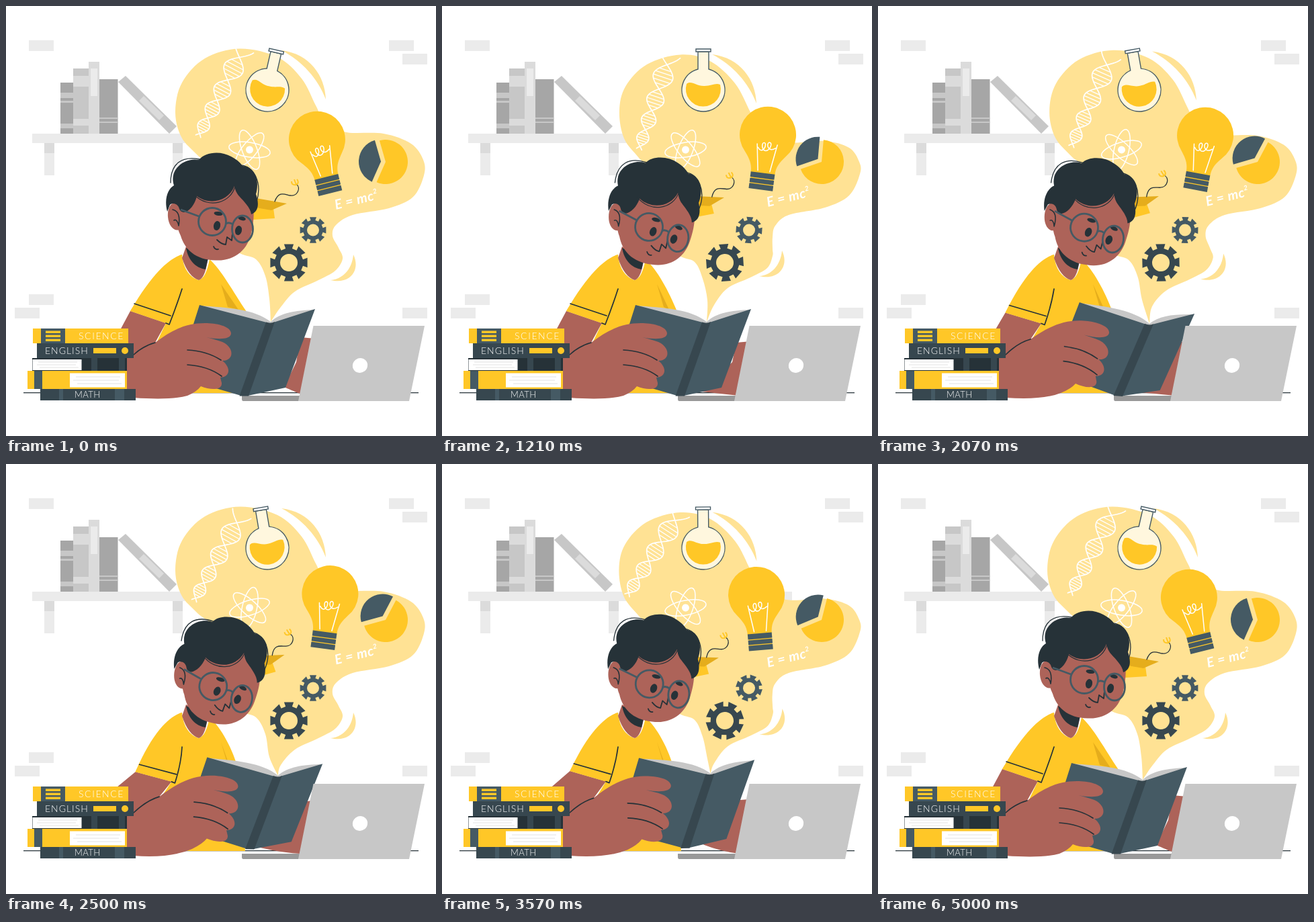
An HTML page that plays this animation: 640 by 640 pixels, repeating every 5.07 s.

```html
<!DOCTYPE html>
<html lang="en">
<head>
<meta charset="utf-8">
<title>Reading</title>
<style>
html,body{margin:0;width:100%;height:100%;overflow:hidden;background:#fff}
svg{display:block;width:100%;height:100%}
text{font-family:Lato,"Open Sans",sans-serif}
.spine{font-weight:300;font-size:14px;fill:#fff}
.line{fill:none;stroke:#263238;stroke-linecap:round;stroke-linejoin:round}
.white{fill:none;stroke:#fff;stroke-linecap:round}
</style>
</head>
<body>
<svg viewBox="0 0 640 640">
  <g id="bricks" fill="#ebebeb"></g>
  <path fill="#ebebeb" d="M39 190H521V204H39ZM57 204h15v48h-15zM248 204h15v48h-15z"/>
  <path fill="#dbdbdb" d="M57 204h15v15h-15zM248 204h15v15h-15z"/>
  <g id="shelf"></g>
  <path fill="#c7c7c7" d="M167 113L178 104L254 179L243 190Z"/>
  <path fill="#dbdbdb" d="M198 141L205 134L235 163L228 170Z"/>
  <path stroke="#263238" stroke-width="1.3" d="M26 575.7H614"/>

  <path id="blob" fill="#ffe294"/>
  <path id="arcTop" fill="#ffe294" d="M410 66C452 71 475 104 476 139C464 108 441 82 410 66Z"/>
  <path id="arcLow" fill="#ffe294" d="M517 370C528 392 513 415 483 408C501 407 515 392 517 370Z"/>
  <g id="dna" class="white" stroke-width="1.7"></g>
  <g id="atom" class="white" stroke-width="1.5"></g>

  <g id="flask">
    <path fill="#fff7de" stroke="#455a64" stroke-width="1.4" d="M-8 -57V-31A32 32 0 1 0 8 -31V-57Z"/>
    <path fill="#ffc727" d="M-25 -9C-18 -15 -10 -5 2 -6C12 -6 18 -11 25 -8A26 26 0 1 1 -25 -9Z"/>
    <path fill="#fff" stroke="#455a64" stroke-width="1.4" d="M-11 -61H11V-57H-11Z"/>
  </g>

  <g id="bulb">
    <path id="rays" class="line" stroke-width="1.4" style="stroke-linecap:butt"/>
    <path fill="#ffc727" d="M-18 58C-18 44 -24 37 -31 28A42 42 0 1 1 31 28C24 37 18 44 18 58Z"/>
    <path class="white" stroke-width="1.5" d="M-8 54L-14 15M10 54L16 13M-12 20C-4 32 2 12 -4 12C-9 13 -5 27 2 23C8 18 8 9 3 11C-1 14 4 26 14 18"/>
    <path fill="#ffc727" d="M-17 57H17V81H-17Z"/>
    <path fill="#455a64" d="M-18 57H18V65H-18ZM-18 66.3H18V73H-18ZM-18 74.3H18V82H-18Z"/>
  </g>

  <path id="pieBig" fill="#ffc727"/>
  <path id="pieCut" fill="#455a64"/>
  <text id="formula" fill="#fff" font-size="20" font-weight="700" font-style="italic" text-anchor="middle" letter-spacing=".6">E = mc<tspan font-size="10" dy="-9">2</tspan></text>
  <path id="gearBig" fill="#37474f" fill-rule="evenodd"/>
  <path id="gearSmall" fill="#455a64" fill-rule="evenodd"/>

  <g id="cap">
    <path fill="#ffc727" d="M-50 6L-20 7L-18 22L-50 24Z"/>
    <path fill="#e5ad1c" d="M0 0L-46 -8L-58 4L-23 10Z"/>
    <path class="line" stroke-width="1.3" d="M-18 -3C-12 -20 -2 -13 5 -12C15 -10 22 -23 14 -29"/>
    <path fill="none" stroke="#ffc727" stroke-width="2" d="M14 -28C8 -27 7 -30 7 -33M14 -28L11 -36M14 -28C18 -30 17 -34 15 -36"/>
  </g>

  <path id="shirt" fill="#ffc727"/>
  <path id="fold" fill="#e5ad1c"/>
  <path fill="#ad6359" d="M268 358L262 375C268 394 277 405 287 408C295 405 298 392 301 374Z"/>
  <path fill="#263238" d="M268 360L301 375L297 392C282 390 271 378 268 360Z"/>

  <g id="head">
    <path class="line" stroke-width="1.3" d="M245 263C245 234 262 223 288 228M342 237C368 233 382 262 373 291"/>
    <path fill="#ad6359" d="M262 278C254 300 250 322 260 342C266 362 282 378 312 378.500C341 380 360 362 365 338C371 312 371 288 355 264L300 255Z"/>
    <path fill="#ad6359" d="M254 294C245 290 240 302 241 314C242 327 250 336 258 333L264 310Z"/>
    <path class="line" stroke-width="1.6" d="M248 303C257 305 259 315 257 327M250 319C253 317 256 321 257 327"/>
    <path fill="#263238" d="M240 306C235 287 241 272 250 267C242 243 266 225 287 229C296 217 320 215 335 224C345 229 350 235 352 238C370 239 378 259 372 280C377 294 376 306 365 310C364 300 354 291 348 284C343 279 341 273 340 268C331 291 303 297 284 283C281 296 273 305 266 307C262 307 259 305 258 302C256 294 248 292 244 296Z"/>
    <path class="line" stroke-width="1.2" d="M280 281C302 303 335 293 341 268C343 280 350 286 356 289"/>
    <g id="face">
      <g fill="#263238">
        <ellipse cx="316" cy="309" rx="6.500" ry="3" transform="rotate(8 316 309)"/>
        <ellipse cx="351" cy="316" rx="6" ry="3" transform="rotate(18 351 316)"/>
      </g>
      <g id="eyes" fill="#263238"></g>
      <path class="line" stroke-width="1.8" d="M314 348C318 352 322 355 327 355L329 344L336 349L337 338M309 358C310 361 313 363 316 362"/>
      <g fill="none" stroke="#455a64" stroke-width="2.800">
        <ellipse cx="307" cy="321" rx="20.500" ry="20.500"/>
        <ellipse cx="352" cy="332" rx="15.500" ry="20"/>
        <path d="M327 324Q332 321 338 325M287 313L260 303"/>
      </g>
    </g>
  </g>

  <path fill="#999" d="M351 580H522V588H353Q351 588 351 585Z"/>
  <path id="armRight" fill="#ad6359"/>
  <g id="book">
    <path fill="#c7c7c7" d="M288 446C330 449 370 451 394 470C408 457 430 453 459 452L400 490Z"/>
    <path id="page" fill="#e0e0e0"/>
    <path fill="#455a64" d="M288 445L388 471L350 580L254 552ZM398 471L460 451L416 568L360 580Z"/>
    <path fill="#37474f" d="M387 470.500Q394 473 400 470L361 580.500H347.500Z"/>
  </g>
  <path id="armLeft" fill="#ad6359"/>
  <path id="sleeve" fill="#ffc727"/>
  <path id="armLines" class="line" stroke-width="1.7"/>

  <g id="stack"></g>
  <g class="spine">
    <text x="108" y="496" letter-spacing="1.600">SCIENCE</text>
    <text x="58" y="518" letter-spacing="1">ENGLISH</text>
    <text x="102" y="583" font-size="13" letter-spacing=".4">MATH</text>
  </g>
  <circle cx="177" cy="513" r="5" fill="#ffc727"/>
  <path stroke="#dbdbdb" stroke-width=".8" d="M48 530H106M46 534H104M50 538H108M104 552H170M100 557H168M106 562H172"/>
  <path fill="#c7c7c7" d="M457.500 476H623L600 588H435Z"/>
  <ellipse cx="527" cy="535" rx="11.300" ry="10.800" fill="#fff" transform="rotate(-35 527 535)"/>
</svg>
<script>
const $ = id => document.getElementById(id);
const set = (id, d) => $(id).setAttribute('d', d);
const move = (id, x, y, a = 0, rest = '') =>
  $(id).setAttribute('transform', `translate(${x} ${y}) rotate(${a}${rest})`);
const TAU = Math.PI * 2, rad = a => a * Math.PI / 180;
const clamp = v => Math.max(0, Math.min(1, v));
const polar = (x, y, r, a) => [x + r * Math.sin(rad(a)), y - r * Math.cos(rad(a))];

function rects(id, list) {
  $(id).insertAdjacentHTML('beforeend', list.map(([x, y, w, h, c]) =>
    `<rect x="${x}" y="${y}" width="${w}" height="${h}"${c ? ` fill="${c}"` : ''}/>`).join(''));
}

// Static parts
rects('bricks', [[34, 51], [570, 51], [590, 71], [34, 429], [13, 449], [590, 449]].map(p => [...p, 37, 16]));
const G1 = '#a6a6a6', G2 = '#c7c7c7', G3 = '#dbdbdb';
rects('shelf', [
  [81, 114, 19, 76, G1], [81, 129, 19, 8, G2], [81, 141, 19, 3, G2], [81, 175, 19, 7, G2],
  [100, 93, 23, 97, G2], [100, 104, 23, 16, G3], [100, 168, 23, 10, G3],
  [123, 83, 16, 107, G3], [126, 93, 10, 41, '#ebebeb'],
  [139, 109, 27.5, 81, G1], [139, 166, 27.5, 2, G2], [139, 172, 27.5, 2, G2]
]);
const Y = '#ffc727', D = '#37474f', M = '#455a64', K = '#263238';
rects('stack', [
  [40, 480, 142, 22, Y], [52, 480, 36, 22, M], [59, 483.5, 22, 3.5, Y], [59, 489.5, 22, 3.5, Y], [59, 495.5, 22, 3.5, Y],
  [46, 502, 144, 22, D], [130, 509, 34, 8, Y],
  [39, 524, 141, 19, K], [39.5, 526, 73, 16, '#fff'], [127, 524, 9, 19, D], [168, 524, 9, 19, D],
  [32, 543, 148, 27, Y], [42, 543, 12, 27, M], [95, 546.5, 82, 21, '#fff'],
  [51, 570, 142, 17, D], [79, 570, 6, 17, M], [162, 570, 14, 17, M]
]);

const strand = side => {
  let d = '';
  for (let k = -.38; k <= 4.2; k += .06) {
    const y = 14 + 40 * k - 2 * k * k - 71, x = side * (16 - 2 * k) * Math.sin(Math.PI * k);
    d += (d ? 'L' : 'M') + x.toFixed(1) + ' ' + y.toFixed(1);
  }
  return d;
};
let rungs = '';
for (let j = 0; j < 4; j++) for (const u of [.2, .35, .5, .65, .8]) {
  const k = j + u, w = (16 - 2 * k) * Math.sin(Math.PI * u);
  rungs += `M${-w} ${40 * k - 2 * k * k - 57}h${2 * w}`;
}
$('dna').innerHTML = `<path d="${strand(1)}${strand(-1)}"/><path stroke-width="1.3" d="${rungs}"/>`;
$('atom').innerHTML = [0, 60, 120].map(a => `<ellipse rx="31" ry="11" transform="rotate(${a})"/>`).join('') +
  '<circle r="5.5" fill="#fff" stroke="none"/>';

function gear(id, out, root, hole) {
  let d = '';
  for (let i = 0; i < 8; i++)
    for (const [r, a] of [[root, -13], [out, -14.5], [out, 14.5], [root, 13]])
      d += (d ? 'L' : 'M') + polar(0, 0, r, i * 45 + a);
  set(id, d + `ZM${-hole} 0a${hole} ${hole} 0 1 0 ${2 * hole} 0a${hole} ${hole} 0 1 0 ${-2 * hole} 0Z`);
}
gear('gearBig', 28.5, 21.5, 13);
gear('gearSmall', 20, 15, 9);

// Periodic monotone curve through six pose values
const LOOP = 5070, STEPS = 71, CYCLE = 70, KEYS = [0, 9, 17, 29, 42, 59];
const keyAt = i => KEYS[(i + 6) % 6] + CYCLE * Math.floor(i / 6);
const segment = f => KEYS.filter(k => k <= f).length - 1;
function track(f, v) {
  const val = i => v[(i + 6) % 6];
  const slope = i => (val(i + 1) - val(i)) / (keyAt(i + 1) - keyAt(i));
  const tan = i => {
    const a = slope(i - 1), b = slope(i);
    return a * b > 0 ? 2 * a * b / (a + b) : 0;
  };
  const i = segment(f), h = keyAt(i + 1) - keyAt(i), u = (f - keyAt(i)) / h, w = 1 - u;
  return val(i) * w * w * (1 + 2 * u) + val(i + 1) * u * u * (3 - 2 * u) +
    h * (tan(i) * u * w * w - tan(i + 1) * u * u * w);
}

function smooth(p) {
  let d = 'M' + p[0];
  for (let i = 0; i < p.length - 1; i++) {
    const a = p[i - 1] || p[i], b = p[i], c = p[i + 1], e = p[i + 2] || c;
    d += `C${b[0] + (c[0] - a[0]) / 6} ${b[1] + (c[1] - a[1]) / 6} ${c[0] - (e[0] - b[0]) / 6} ${c[1] - (e[1] - b[1]) / 6} ${c[0]} ${c[1]}`;
  }
  return d + 'Z';
}

// x, y and how far each point travels
const BLOB = [
  [392, 436, 3, 2], [386, 402, 2, 4], [372, 377, 4, 4], [345, 366, 6, 4], [322, 335, 0, 0], [312, 250, 0, 0],
  [285, 222, 8, 4], [261, 195, 10, 2], [252, 157, 12, 0], [262, 114, 11, 6], [296, 78, 9, 9], [348, 63.5, 7, 9],
  [404, 76, -5, 6], [440, 108, -4, 7], [461, 148, -2, 10], [476, 175, -2, 12], [507, 188, 8, 15],
  [562, 190, 8, 11], [603, 205, 3, 6], [621, 229, 0, 3], [622, 252, 0, -2], [606, 284, 0, -2], [570, 301, 0, -1],
  [516, 311, 0, 0], [491, 326, 5, 1], [486, 342, 6, 2], [495, 360, -3, 2], [501, 376, -9, -4],
  [490, 394, -6, -4], [465, 408, -6, -4], [430, 425, -5, -5], [409, 448, -4, -3]
];

function pie(id, x, y, from, to) {
  const r = 33;
  set(id, `M${x} ${y}L${polar(x, y, r, from)}A${r} ${r} 0 ${to - from > 180 ? 1 : 0} 1 ${polar(x, y, r, to)}Z`);
}

function drawIdeas(f, gutter) {
  const b = (1 - Math.cos(TAU * f / 35)) / 2;
  set('blob', smooth([gutter, ...BLOB.map(([x, y, dx, dy]) => [x + dx * b, y + dy * b]), gutter]));
  move('arcTop', -8 * b, 6 * b);
  move('arcLow', -11 * b, -6 * b);

  move('dna', track(f, [321, 317, 317, 318, 314, 319.5]), track(f, [127, 134.5, 141.5, 140, 134, 130]),
    track(f, [27.6, 21.4, 18.3, 23.6, 33, 31.4]));
  move('atom', 362.5, 214, track(f, [9, 2, -9, -17, -18, 1]));
  move('flask', 389, 125, track(f, [13, 9.5, 0, -10, -8.5, 10]));

  move('bulb', track(f, [463, 472, 485, 487, 474, 464]), track(f, [199, 195, 192, 193, 194, 197]),
    track(f, [-14, -5, 7.5, 10.5, 2, -11]));
  const p = f / 17.5 % 1, grow = clamp((p - .1) / .22), fade = clamp((p - .4) / .12);
  let rays = '';
  if (grow > 0 && fade < 1) for (let a = -120; a <= 120; a += 30)
    rays += `M${polar(0, 0, 48 + 9 * fade, a)}L${polar(0, 0, 48 + 9 * grow, a)}`;
  set('rays', rays);

  const hi = track(f, [-16, -8, 5, 28, 27, -6]), lo = track(f, [-156, -132, -109, -106, -105, -130]);
  pie('pieBig', 565, 232, hi, lo + 360);
  pie('pieCut', ...polar(565, 232, 7, (hi + lo) / 2), lo, hi);

  move('formula', 523 - 6 * b, 295 + track(f, [0, -2, -4, -5, -3, 2]), -14);
  const turn = f / CYCLE * 540;
  move('gearBig', 421, 382, turn);
  move('gearSmall', 457, 333.5, -turn);
  move('cap', track(f, [418, 419, 420, 418, 411, 414]), track(f, [294, 291, 285, 283, 286, 291]),
    track(f, [0, -3, -7, -12, -12, -2]));
}

function drawHead(f) {
  const h = track(f, [0, .6, 1, 1.1, 1.45, 0]);
  move('head', track(f, [0, 1, 1, 0, 3, 0]), 4 * h, 6 * h, ' 290 370');
  move('face', -5 * h, 3 * h, 1.5 * h, ' 330 330');
  const open = .35 + .65 * clamp((Math.abs(f - 9) - .5) / 2);
  $('eyes').innerHTML = [[314, 327, 5], [346, 334, 5]].map(([x, y, r]) =>
    `<ellipse cx="${x}" cy="${y}" rx="${r}" ry="${7 * open}" transform="rotate(14 ${x} ${y})"/>`).join('');
}

function drawBody(f, dx, dy, rot) {
  const c = Math.cos(rad(rot)), s = Math.sin(rad(rot));
  // Point carried along with the book by weight w
  const P = (x, y, w = 1) => {
    const u = x - 354, v = y - 580;
    return [x + w * (u * c - v * s - u + dx), y + w * (u * s + v * c - v + dy)].map(n => n.toFixed(2)).join(' ');
  };
  const lift = track(f, [0, .9, 0, .5, 1.1, 0]);
  const i = segment(f), u = (f - KEYS[i]) / (keyAt(i + 1) - KEYS[i]);
  const swing = i < 5 ? -14 * Math.sin(Math.PI * u) ** 2 : 0;
  const L = [185 + 9 * lift, 454 + 5 * lift], R = [238 + 10 * lift, 472 + lift];
  const edge = track(f, [358, 352, 350, 349, 342, 352]);

  set('shirt', `M262 370C248 374 226 390 ${L}L${R}L215 520L230 576H356L${edge} 455C338 425 320 392 303 377C299 396 295 405 287 408C274 404 264 392 262 370Z`);
  set('fold', `M320 414L${edge - 12} 452L330 448Z`);
  set('sleeve', `M262 370C248 374 222 390 ${L}L${R}L262 421Z`);
  set('armLeft', `M${L}L${170 + 9 * lift + swing} 482L165 560L190 583Q245 587 ${P(270, 580, .8)}Q${P(284, 574)} ${P(290, 566)}` +
    `C${P(305, 572)} ${P(322, 572)} ${P(321, 561)}L${P(319, 553)}C${P(334, 552)} ${P(335, 538)} ${P(322, 528)}` +
    `C${P(340, 528)} ${P(340, 508)} ${P(322, 500)}C${P(314, 497)} ${P(306, 495)} ${P(298, 493)}` +
    `C${P(318, 497)} ${P(335, 496)} ${P(335, 487)}C${P(334, 476)} ${P(312, 472)} ${P(296, 472)}` +
    `C${P(268, 472)} ${P(247, 482, .9)} ${P(222, 501, .6)}L${R}Z`);
  set('armLines', `M${L[0] + 6} ${L[1] - 11}L${R[0] + 7} ${R[1] - 11}M262 421Q${254 + 8 * lift} 446 ${R[0] + 5} ${R[1] + 2}L${R}` +
    `M190 519Q${P(204, 506, .5)} ${P(222, 501, .6)}M${P(270, 512)}C${P(290, 513)} ${P(306, 518)} ${P(320, 527)}` +
    `M${P(270, 534)}C${P(288, 535)} ${P(306, 540)} ${P(321, 551)}`);

  const r = track(f, [0, 1, 1, 1, 1.7, 0]);
  set('armRight', `M438 ${493 + 8 * r}L460 ${495 + 4 * r}L442 ${579 + r}Q${420 - 6 * r} ${570 + 7 * r} ${414 - 27 * r} ${567 + track(f, [0, 7, 7, 8, -1, 0])}L432 530Z`);

  // One leaf turns over from right to left
  const q = (f - 5) / 7;
  let leaf = '';
  if (q > 0 && q < 1) {
    const a = Math.PI * q, x = 394 + 62 * Math.cos(a), y = 455 - 22 * Math.sin(a);
    leaf = `M394 474L${x} ${y}Q${x + 26} ${y + 2} ${x + 42 * Math.sin(a)} ${y + 13}L400 480Z`;
  }
  set('page', leaf);
}

function draw(f) {
  const dx = track(f, [0, 12, 0, 3, 14, 0]), dy = track(f, [0, -4, 0, 0, -16, 0]), rot = track(f, [0, -.6, 0, 3.7, -2, 0]);
  move('book', dx, dy, rot, ' 354 580');
  drawIdeas(f, [394 + dx + 1.9 * rot, 470 + dy + .7 * rot]);
  drawHead(f);
  drawBody(f, dx, dy, rot);
}

let start, last = -1;
function tick(now) {
  start ??= now;
  const step = Math.floor(((now - start) % LOOP + 5) / (LOOP / STEPS)) % STEPS % CYCLE;
  if (step !== last) draw(last = step);
  requestAnimationFrame(tick);
}
draw(0);
requestAnimationFrame(tick);
</script>
</body>
</html>
```
